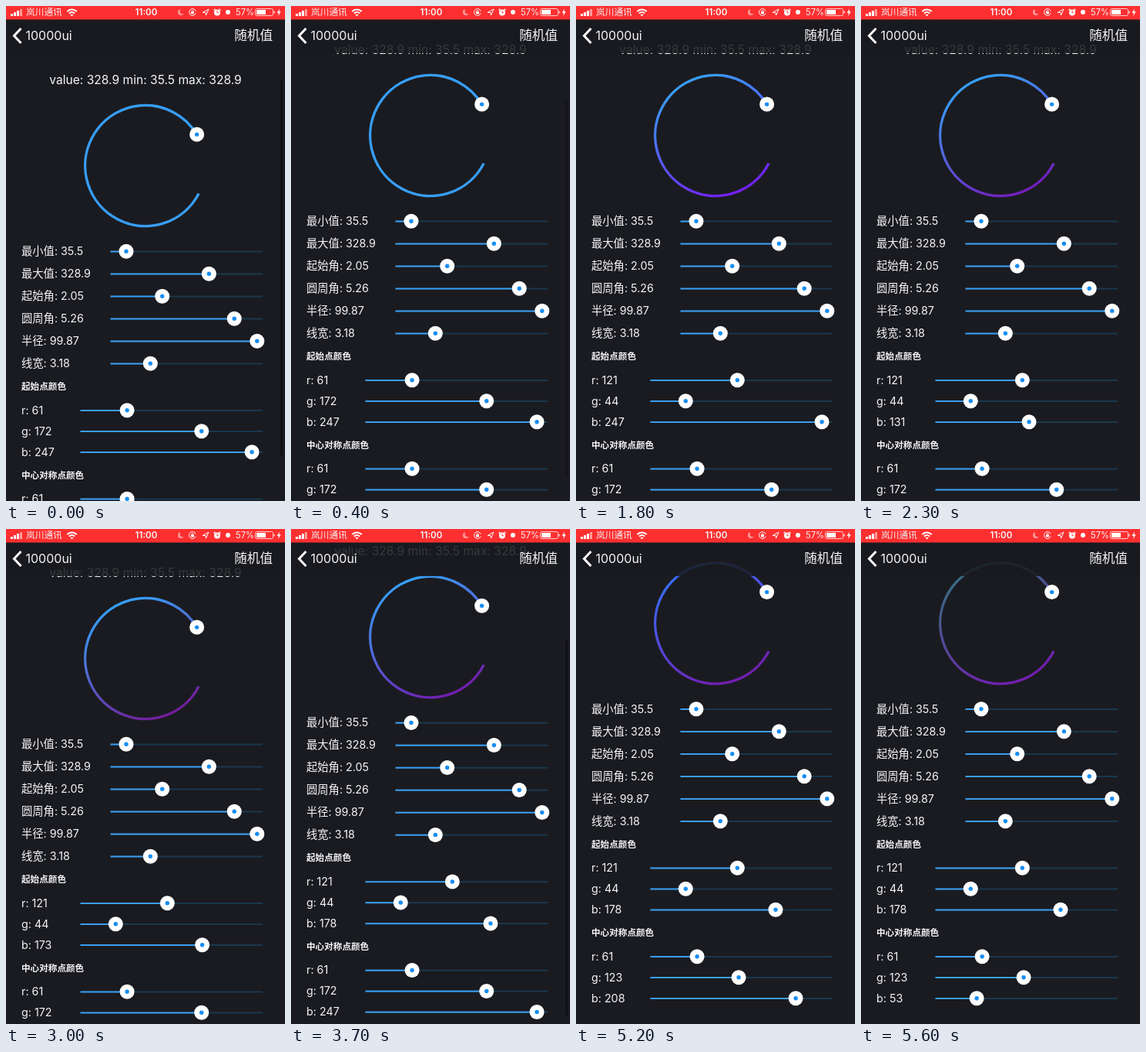
Animation, 362 px wide and 640 px high, one loop 5700 ms. Source, as an HTML page with a canvas:

```html
<!DOCTYPE html>
<html lang="zh-CN">
<head>
<meta charset="utf-8">
<style>
html, body { margin: 0; width: 100%; height: 100%; overflow: hidden; background: #1a1b20; }
canvas { display: block; width: 100vw; height: 100vh; }
</style>
</head>
<body>
<canvas id="stage" width="362" height="640"></canvas>
<script>
const c = document.getElementById('stage').getContext('2d');
const FONT = 'Inter, "Noto Sans CJK SC", "Noto Sans CJK", sans-serif';
const LOOP = 5700, STEP = 100, LAG = 200, TAU = Math.PI * 2;
const RED = '#fd2f30', PINK = '#ff9a98';

const dial = { value: 328.9, min: 35.5, start: 2.05, sweep: 5.26, radius: 99.87, width: 3.18 };
const settings = [
  ['最小值', dial.min, dial.min / 500],
  ['最大值', dial.value, dial.value / 500],
  ['起始角', dial.start, dial.start / TAU],
  ['圆周角', dial.sweep, dial.sweep / TAU],
  ['半径', dial.radius, dial.radius / 100],
  ['线宽', dial.width, (dial.width - 1) / 9]
];

// Share of a move done at time t; power 1 is linear, higher eases out
function ease(t, start, length, power = 3) {
  const p = Math.min(1, Math.max(0, (t - start) / length));
  return 1 - (1 - p) ** power;
}

const move = (t, from, to, ...timing) => from + (to - from) * ease(t, ...timing);

const scrollAt = t => move(t, move(t, 0, 39, 0, 370), 84.5, 3600, 370);

const barAlpha = t => 1 - ease(t, 300, 300, 1) + ease(t, 3600, 100, 1) - ease(t, 3900, 300, 1);

const startColor = t => [
  move(t, 61, 121, 500, 600),
  move(t, 172, 44, 1200, 545),
  move(t, move(t, 247, 114, 2000, 600), 178, 2600, 700)
].map(Math.round);

const centerColor = t => [
  61,
  move(t, 172, 123, 4300, 165),
  move(t, 247, 53, 5100, 500, 1)
].map(Math.round);

function rect(x, y, w, h, color) {
  c.fillStyle = color;
  c.fillRect(x, y, w, h);
}

function disc(x, y, r, color) {
  c.fillStyle = color;
  c.beginPath();
  c.arc(x, y, r, 0, TAU);
  c.fill();
}

function ring(x, y, r, width, from = 0, to = TAU) {
  c.lineWidth = width;
  c.beginPath();
  c.arc(x, y, r, from, to);
  c.stroke();
}

function line(points, width) {
  c.lineWidth = width;
  c.beginPath();
  points.forEach(p => c.lineTo(...p));
  c.stroke();
}

function shape(points) {
  c.fillStyle = '#fff';
  c.beginPath();
  points.forEach(p => c.lineTo(...p));
  c.fill();
}

function text(s, x, y, size, align = 'left', weight = 400) {
  c.font = `${weight} ${size}px ${FONT}`;
  c.textAlign = align;
  c.fillStyle = '#f5f5f6';
  c.fillText(s, x, y + size * 0.36);
}

function knob(x, y) {
  disc(x, y, 9.5, '#fff');
  disc(x, y, 2.7, '#168df2');
}

function slider(label, value, left, share, y) {
  const x = left + 7.5 + share * (318.5 - left);
  text(`${label}: ${value}`, 20, y, 14.3);
  rect(left, y - 0.5, 333 - left, 2, '#18384e');
  rect(left, y - 0.5, x - left, 2, '#3b9df0');
  knob(x, y + 0.3);
}

function colorGroup(title, values, y) {
  text(title, 20, y, 11.6, 'left', 700);
  values.forEach((v, i) => slider('rgb'[i], v, 96.5, v / 255, y + 30.5 + i * 27));
}

function drawDial(t) {
  const x = 180.8, y = 206.5, r = 78.1;
  const from = dial.start - TAU / 4, to = from + dial.sweep;
  const dx = r * Math.cos(1.13), dy = r * Math.sin(1.13);
  const fill = c.createLinearGradient(x + dx, y + dy, x - dx, y - dy);
  // The dial repaints a little after the sliders, in a slightly cooler tone
  [startColor, centerColor].forEach((color, i) => {
    const [red, green, blue] = color(t - LAG);
    fill.addColorStop(i, `rgb(${red - 6},${green - 14},${blue})`);
  });
  c.strokeStyle = fill;
  ring(x, y, r, 3.4, from, to);
  knob(x + r * Math.cos(to), y + r * Math.sin(to));
}

function statusBar() {
  rect(0, 0, 362, 17.5, RED);
  for (let i = 0; i < 4; i++) rect(6 + i * 4, 10 - i * 2, 3, 3 + i * 2, i < 3 ? '#fff' : PINK);
  text('岚川通讯', 26, 8, 11.7);
  text('11:00', 182, 8, 11.6, 'center', 600);
  text('57%', 298, 8, 11.2);

  // Wi-Fi
  c.strokeStyle = '#fff';
  for (const r of [5, 8.5]) ring(85.5, 13, r, 2, -TAU * 0.38, -TAU * 0.12);
  shape([[85.5, 13.5], [83.3, 10.8], [87.7, 10.8]]);

  // Moon
  disc(227, 8, 4, PINK);
  disc(229.3, 6.5, 3.7, RED);

  // Rotation lock
  ring(242, 8, 4.4, 1, 0.3, TAU - 0.3);
  rect(240, 7.3, 4, 3, '#fff');
  ring(242, 7.2, 1.3, 0.9, TAU / 2, TAU);

  // Location
  line([[255, 8.5], [263, 4], [259.5, 12], [259, 8.5], [255, 8.5]], 1);

  // Alarm
  disc(274, 8.5, 4, '#fff');
  for (const s of [-1, 1]) line([[274 + s * 4.5, 5.5], [274 + s * 2.5, 3.8]], 1.3);
  c.strokeStyle = RED;
  line([[274, 6], [274, 8.7], [276, 8.7]], 0.9);

  disc(288, 8, 3, '#fff');

  // Battery
  c.strokeStyle = '#ffd0d0';
  c.lineWidth = 1;
  c.beginPath();
  c.roundRect(323.5, 3.5, 23, 9, 2);
  c.stroke();
  rect(325, 5, 12, 6, '#fff');
  rect(347.5, 6.5, 1.3, 3, '#ffd0d0');
  shape([[355, 3.5], [351.5, 8.8], [353.8, 8.8], [353, 13], [356.7, 7.2], [354.3, 7.2]]);
}

function navBar() {
  rect(0, 17, 362, 44, 'rgba(26,27,32,0.87)');
  c.strokeStyle = '#fff';
  line([[19.5, 29], [10.5, 38.5], [19.5, 48]], 3);
  text('10000ui', 25.5, 38.5, 16);
  text('随机值', 346, 38.5, 16.6, 'right');
}

function draw(t) {
  const scroll = scrollAt(t);
  rect(0, 0, 362, 640, '#1a1b20');
  c.save();
  c.translate(0, -scroll);
  text(`value: ${dial.value} min: ${dial.min} max: ${dial.value}`, 181, 95, 15.6, 'center');
  drawDial(t);
  settings.forEach(([label, value, share], i) => slider(label, value, 135.5, share, 317 + i * 29));
  colorGroup('起始点颜色', startColor(t), 492);
  colorGroup('中心对称点颜色', centerColor(t), 606.5);
  c.restore();

  rect(356.5, 95 + scroll * 0.72, 2.4, 486, `rgba(10,11,13,${barAlpha(t) * 0.7})`);
  navBar();
  statusBar();
}

function tick() {
  const t = performance.now() % LOOP;
  draw(Math.floor(t / STEP) * STEP);
  requestAnimationFrame(tick);
}
tick();
</script>
</body>
</html>
```
